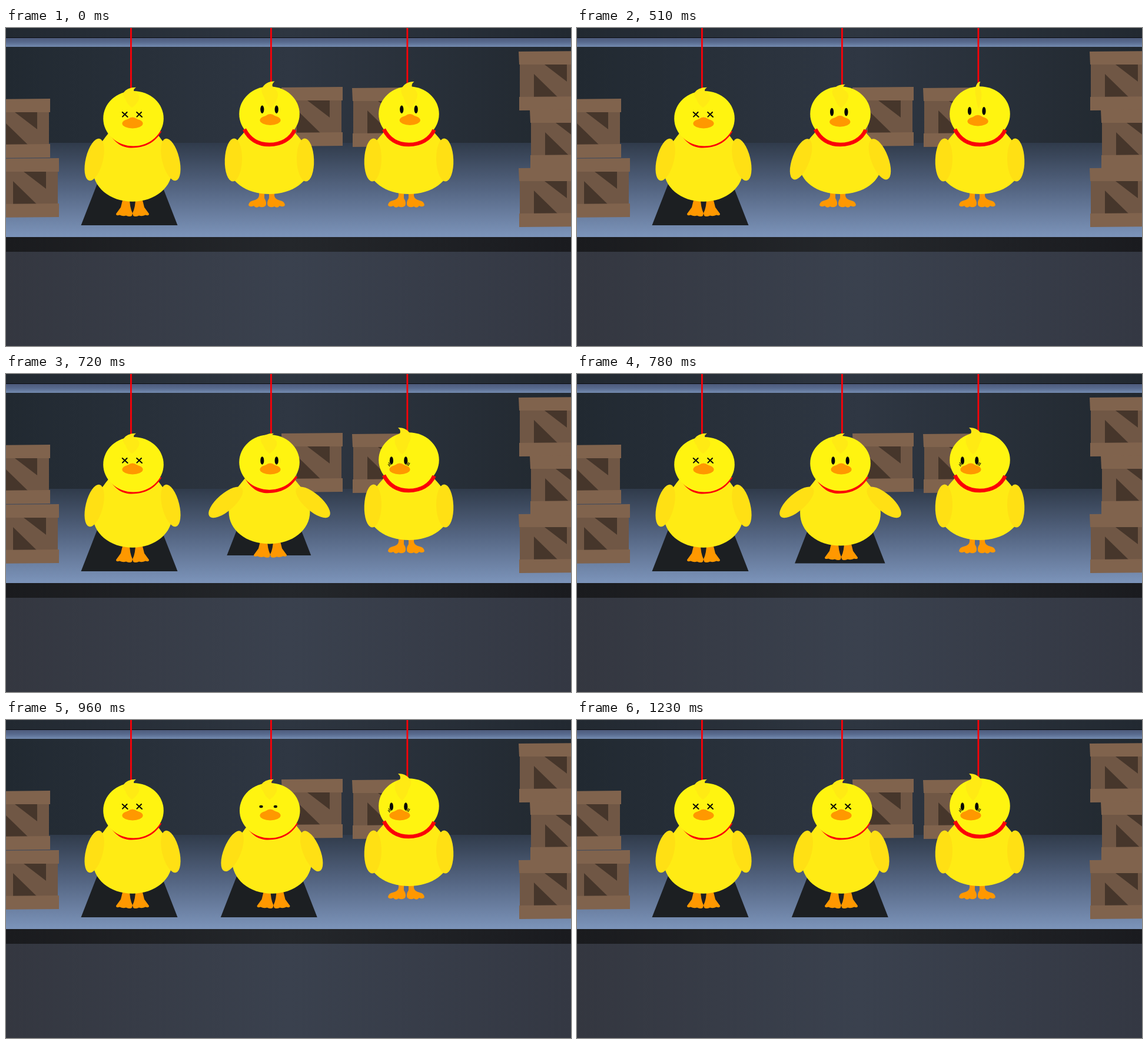
Animation, 960 px wide and 540 px high, one loop 1.26 s. Source, as an HTML page with a canvas:

```html
<!DOCTYPE html>
<html lang="en">
<head>
<meta charset="utf-8">
<title>Three ducks</title>
<style>
html, body { margin: 0; width: 100%; height: 100%; overflow: hidden; background: #343841; }
canvas { display: block; }
</style>
</head>
<body>
<canvas id="stage" width="960" height="540"></canvas>
<script>
const ctx = document.getElementById('stage').getContext('2d');
const LOOP = 1260, STEP = 30, GAP = 237, MIDDLE = 447.5;
const HEAD = '#fff410', BODY = '#ffeb14', WING = '#ffe014', TUFT = '#ffea14';
const ORANGE = '#ff9800', RED = '#fb0007', BLACK = '#050505';
const LIGHT = '#80634d', WOOD = '#705745', DARK = '#46362b';

const ramp = (t, a, b) => Math.min(1, Math.max(0, (t - a) / (b - a)));

function fill(d, color) {
  ctx.fillStyle = color;
  ctx.fill(new Path2D(d));
}

function line(d, color, width) {
  ctx.strokeStyle = color;
  ctx.lineWidth = width;
  ctx.stroke(new Path2D(d));
}

function oval(x, y, rx, ry, color, angle = 0) {
  ctx.fillStyle = color;
  ctx.beginPath();
  ctx.ellipse(x, y, rx, ry, angle, 0, Math.PI * 2);
  ctx.fill();
}

function at(x, y, draw, sx = 1, sy = 1) {
  ctx.save();
  ctx.translate(x, y);
  ctx.scale(sx, sy);
  draw();
  ctx.restore();
}

function band(y, h, colors, across) {
  const g = across ? ctx.createLinearGradient(0, 0, 960, 0)
                   : ctx.createLinearGradient(0, y, 0, y + h);
  colors.forEach((c, i) => g.addColorStop(i / (colors.length - 1), c));
  ctx.fillStyle = g;
  ctx.fillRect(0, y, 960, h);
}

function crate(x, y) {
  at(x, y, () => {
    fill('M2 20H102V80H2Z', WOOD);
    fill('M44 23H82V52Z', DARK);
    fill('M26 39V78H66Z', DARK);
    fill('M0 1L104 0L104 23L1 23Z', LIGHT);
    fill('M1 78L104 77L104 100L1 101Z', LIGHT);
  });
}

function scenery() {
  band(0, 16, ['#222931', '#2e3641', '#222931'], true);
  band(32, 164, ['#212931', '#2f3743', '#21282f'], true);
  band(16, 16, ['#4c5878', '#586a8e', '#748bb0']);
  band(16, 1, ['#0b0d12', '#0b0d12']);
  band(195, 160, ['#303b4b', '#556683', '#7c94ba']);
  band(355, 25, ['#1a1b1e', '#24272b', '#1a1b1f'], true);
  band(380, 160, ['#343740', '#3a414e', '#343843'], true);
  crate(468, 100);
  crate(588, 101);
  crate(-29, 120);
  crate(-14, 221);
  for (let i = 0; i < 3; i++) crate(i === 1 ? 890 : 871, 39 + i * 99);
}

// Black hatch whose front edge slides towards the viewer.
function hatch(cx, y) {
  const half = v => 82 - (335 - v) * 0.39;
  if (y > 245) {
    fill(`M${cx - half(240)} 240H${cx + half(240)}L${cx + half(y)} ${y}H${cx - half(y)}Z`, '#1c1f22');
  }
}

function standingFoot() {
  fill('M-13 -12H-4V6Q1 14 -2 19Q-7 23 -13 20Q-18 24 -22 19Q-28 22 -31 18Q-30 11 -23 10Q-14 8 -13 2Z', ORANGE);
}

function hangingFoot() {
  fill('M5 -6H16L20 10L28 21Q28 25 22 23Q16 26 11 24Q4 27 1 24L0 20Q5 10 5 -6Z', ORANGE);
}

function torso() {
  fill('M-42 -48C-50 -38 -70 -20 -70 6C-70 36 -40 58 0 58C40 58 70 36 70 6C70 -20 50 -38 42 -48Z', BODY);
}

function wing(angle) {
  oval(-60.5 - 18 * Math.sin(angle), 206 + 18 * Math.cos(angle), 14.6, 36.6, WING, angle);
}

function tuft() {
  fill('M-13 4Q-7 -9 9 -9Q3 -4 6 1Q17 8 14 18Q10 30 2 37Q-6 30 -9 18Q-14 10 -13 4Z', TUFT);
}

function eyes(p) {
  at(p.eyeX, 138.3 + 8.7 * p.down, () => {
    ctx.lineCap = 'round';
    for (const x of [-12.2, 12.2]) {
      if (p.open > 0) oval(x, 0, 3.1, p.open, BLACK);
      else at(x, 0, () => line('M-4.3 -4L4.6 4M-4 3.6L3.6 -4', BLACK, 2));
    }
    ctx.lineCap = 'butt';
    if (p.lashes) line('M-17 3L-14 8M-18 6L-15 10M16 9L19 4M14 8L17 3', BLACK, 1.1);
  });
}

// x runs from the duck's middle line, y from the top of the stage.
function duck(x, p) {
  at(x, 0, () => {
    for (const side of [1, -1]) {
      if (p.hung) at(p.footX, p.footY, hangingFoot, side);
      else at(-4.5, 283, standingFoot, side);
    }
    at(p.bodyX, 224 + 7 * p.drop, torso, 1 - 0.03 * p.drop, 1 + 0.1 * p.drop);
    for (const side of [1, -1]) at(p.bodyX, 0, () => wing(p.lift), side);

    const headY = 146 + 7.7 * p.drop;
    const head = () => oval(p.headX, headY, 51.3, 46.8, HEAD);
    const ring = draw => at(p.headX, 201 + 2.5 * p.drop, draw);
    if (p.hung) {
      ring(() => fill('M-43 -28C-32 -7 -18 0 -3 0C20 -0.5 36 -8 48 -28Z', RED));
      head();
    } else {
      head();
      ring(() => line('M-42.5 -29C-33 -10 -18 -3 0 -3C20 -3 36 -12 43 -28', RED, 6.6));
    }
    at(p.tuftX, p.tuftY, tuft, p.flip, p.tuftH);
    eyes(p);
    const beakY = 156 + 5.5 * p.down;
    oval(p.beakX, beakY + 0.6, 17.6, 8.3, ORANGE);
    oval(p.beakX, beakY - 1, 10, 9, ORANGE);
  });
}

// Looks down, flaps while the floor opens, sinks, then closes its eyes.
function fallingPose(t) {
  const down = ramp(t, 420, 600), drop = ramp(t, 600, 840);
  const rest = ramp(t, 870, 1230), sway = Math.sin(Math.PI * Math.sqrt(rest));
  const glance = 4.5 * (down - ramp(t, 600, 720));
  const degrees = 2 + 47 * ramp(t, 390, 690) - 27 * ramp(t, 870, 960) - 8 * ramp(t, 960, 1230);
  return {
    down, drop,
    hung: t >= 660,
    lift: degrees * Math.PI / 180,
    headX: 3 * rest,
    bodyX: 1.5 * rest + 4 * sway,
    footX: 1.5 + 5.5 * sway,
    footY: 278 + 16.5 * drop,
    eyeX: 0.7 * rest - glance - 2 * sway,
    beakX: 1.5 - glance,
    tuftX: -1.5 * down,
    tuftY: 99.5 + 8 * down,
    tuftH: 1 - 0.25 * down,
    flip: 1,
    open: 6.8 * (1 - ramp(t, 900, 990))
  };
}

// Stands still and turns its head towards the middle duck.
function watchingPose(t) {
  const turn = ramp(t, 420, 720);
  return {
    ...fallingPose(0),
    down: turn,
    eyeX: -17.4 * turn,
    beakX: 1.8 - 17.3 * turn,
    tuftX: -9.5 * turn,
    tuftY: 100,
    flip: 1 - 2 * turn,
    lashes: turn > 0.6
  };
}

function draw(t) {
  scenery();
  hatch(209.5, 335);
  hatch(446.8, 239 + 42 * ramp(t, 420, 600) + 54 * ramp(t, 600, 840));
  line('M212.4 0V108M450.4 0V106M681.9 0V104', RED, 2.8);
  duck(MIDDLE - 234, fallingPose(LOOP - STEP));
  duck(MIDDLE, fallingPose(t));
  duck(MIDDLE + GAP, watchingPose(t));
}

const start = performance.now();
function frame() {
  const t = (performance.now() - start) % LOOP;
  draw(Math.floor(t / STEP) * STEP);
  requestAnimationFrame(frame);
}
frame();
</script>
</body>
</html>
```
